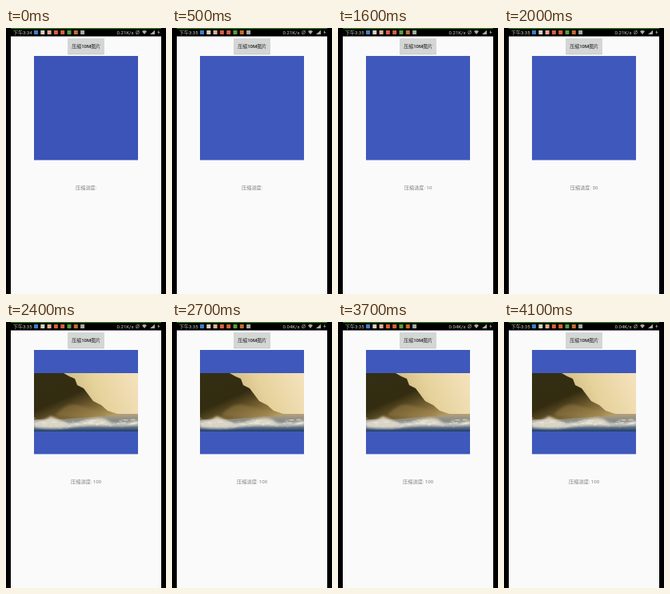
Recreate the animation shown at these times as an HTML page. Size 200 by 333 pixels, loop 4.2 s.

```html
<!DOCTYPE html>
<html>
<head>
<meta charset="utf-8">
<style>
html, body { margin: 0; width: 100%; height: 100%; overflow: hidden; background: #000; }
svg { display: block; width: 100vw; height: 100vh; }
text { font-family: Roboto, "Noto Sans CJK SC", "Noto Sans CJK", sans-serif; }
.status { font-size: 6px; fill: #ccc; }
.middle { text-anchor: middle; }
</style>
</head>
<body>
<svg viewBox="0 0 200 333">
  <defs>
    <linearGradient id="sky" x1=".25" y1=".3" x2="1" y2=".1">
      <stop offset="0" stop-color="#c9b37a"/>
      <stop offset=".45" stop-color="#e6d29b"/>
      <stop offset="1" stop-color="#f4e2bd"/>
    </linearGradient>
    <linearGradient id="hill" x1="0" y1="0" x2=".8" y2="1">
      <stop offset="0" stop-color="#332e15"/>
      <stop offset=".5" stop-color="#332c10"/>
      <stop offset=".75" stop-color="#756032"/>
      <stop offset="1" stop-color="#b59a60"/>
    </linearGradient>
    <linearGradient id="sea" x1="0" y1="0" x2="0" y2="1">
      <stop offset="0" stop-color="#b5a27d"/>
      <stop offset=".35" stop-color="#8a8c86"/>
      <stop offset=".65" stop-color="#7e8996"/>
      <stop offset="1" stop-color="#1d3c63"/>
    </linearGradient>
    <clipPath id="frame"><rect x="35" y="64" width="130" height="73"/></clipPath>
    <filter id="mist"><feGaussianBlur stdDeviation="1.6"/></filter>
  </defs>

  <rect width="200" height="333" fill="#000"/>
  <rect x="6" y="10.5" width="188" height="323" fill="#fafafa"/>
  <rect x="6" width="188" height="1" fill="#2f8a12"/>

  <text id="clock" class="status" x="9" y="7.7"></text>
  <g id="badges"></g>
  <text id="speed" class="status" x="138.6" y="7.7"></text>
  <g fill="none" stroke="#aaa" stroke-width=".7">
    <circle cx="164.5" cy="5.5" r="2"/>
    <path d="M162.5 8l4-5"/>
  </g>
  <path d="M170 4.2q3-2.2 6 0l-3 3.8zM180 8h6V2.8zM191.3 2.5l-2 3.2h1.4l-.6 2.6 2.2-3.4h-1.4z" fill="#aaa"/>

  <rect x="77" y="13.8" width="46" height="19.4" rx="1" fill="#c2c2c2"/>
  <rect x="77" y="13" width="46" height="19.4" rx="1" fill="#d4d5d5"/>
  <text class="middle" x="100.2" y="25.2" font-size="6" font-weight="500" fill="#222">压缩10M图片</text>

  <rect id="panel" x="35" y="35" width="130" height="130.4"/>
  <g id="photo" clip-path="url(#frame)">
    <rect x="35" y="64" width="130" height="73" fill="url(#sky)"/>
    <rect x="35" y="115" width="130" height="22" fill="url(#sea)"/>
    <path d="M35 64H72L79 68 86 71 89 79 97 83 103 91 109 99 119 104 127 111 142 116 110 119 70 122 35 122z" fill="url(#hill)"/>
    <path d="M62 116Q76 100 90 104T116 111L126 118H66z" fill="#9b8148" opacity=".45" filter="url(#mist)"/>
    <g fill="#e9e2cf" filter="url(#mist)">
      <path d="M35 124Q48 124 56 118Q64 121 72 125T100 123T128 124T165 123V129Q140 131 120 130T80 132T35 132z" opacity=".85"/>
    </g>
    <g id="foam" fill="#f4efe0"></g>
  </g>
  <text id="progress" class="middle" x="100.2" y="201.7" font-size="6.2" fill="#808080"></text>
</svg>
<script>
const LOOP = 4200;
const byId = id => document.getElementById(id);

function add(parent, tag, attributes) {
  const node = document.createElementNS("http://www.w3.org/2000/svg", tag);
  for (const name in attributes) node.setAttribute(name, attributes[name]);
  byId(parent).append(node);
}

["#3f7fc8", "#d8cfc4", "#dcae9c", "#d9603c", "#d9603c", "#5c9a45", "#c06c32", "#a8a8a8"]
  .forEach((fill, i) => add("badges", "rect", { x: 35 + i * 8.3, y: 3, width: 5, height: 5, fill }));

let seed = 11;
const random = () => (seed = (seed * 16807) % 2147483647) / 2147483647;
for (let i = 0; i < 70; i++) {
  const x = 35 + random() * 130;
  const spread = random() + random() - 1;
  add("foam", "ellipse", {
    cx: x, cy: 127 + Math.sin(x / 9) * 1.5 + spread * 6,
    rx: 1 + random() * 3, ry: .3 + random() * .6, opacity: .2 + random() * .5
  });
}

// Each list holds [start time, value] pairs; the last one reached applies.
const valueAt = (steps, t) => steps.filter(([start]) => t >= start).pop()[1];
const clock = [[0, "下午3:34"], [400, "下午3:35"]];
const blue = [[0, "#3c53b7"], [400, "#3f58bc"]];
const speed = [[0, "0.21K/s"], [2500, "0.04K/s"]];
const progress = [[0, ""], [1600, " 10"], [1800, " 20"], [1900, " 30"], [2100, " 60"], [2200, " 90"], [2300, " 100"]];

function draw(now) {
  const t = now % LOOP;
  byId("clock").textContent = valueAt(clock, t);
  byId("speed").textContent = valueAt(speed, t);
  byId("progress").textContent = "压缩进度:" + valueAt(progress, t);
  byId("panel").setAttribute("fill", valueAt(blue, t));
  byId("photo").style.display = t >= 2300 ? "" : "none";
  requestAnimationFrame(draw);
}
draw(performance.now());
</script>
</body>
</html>
```
